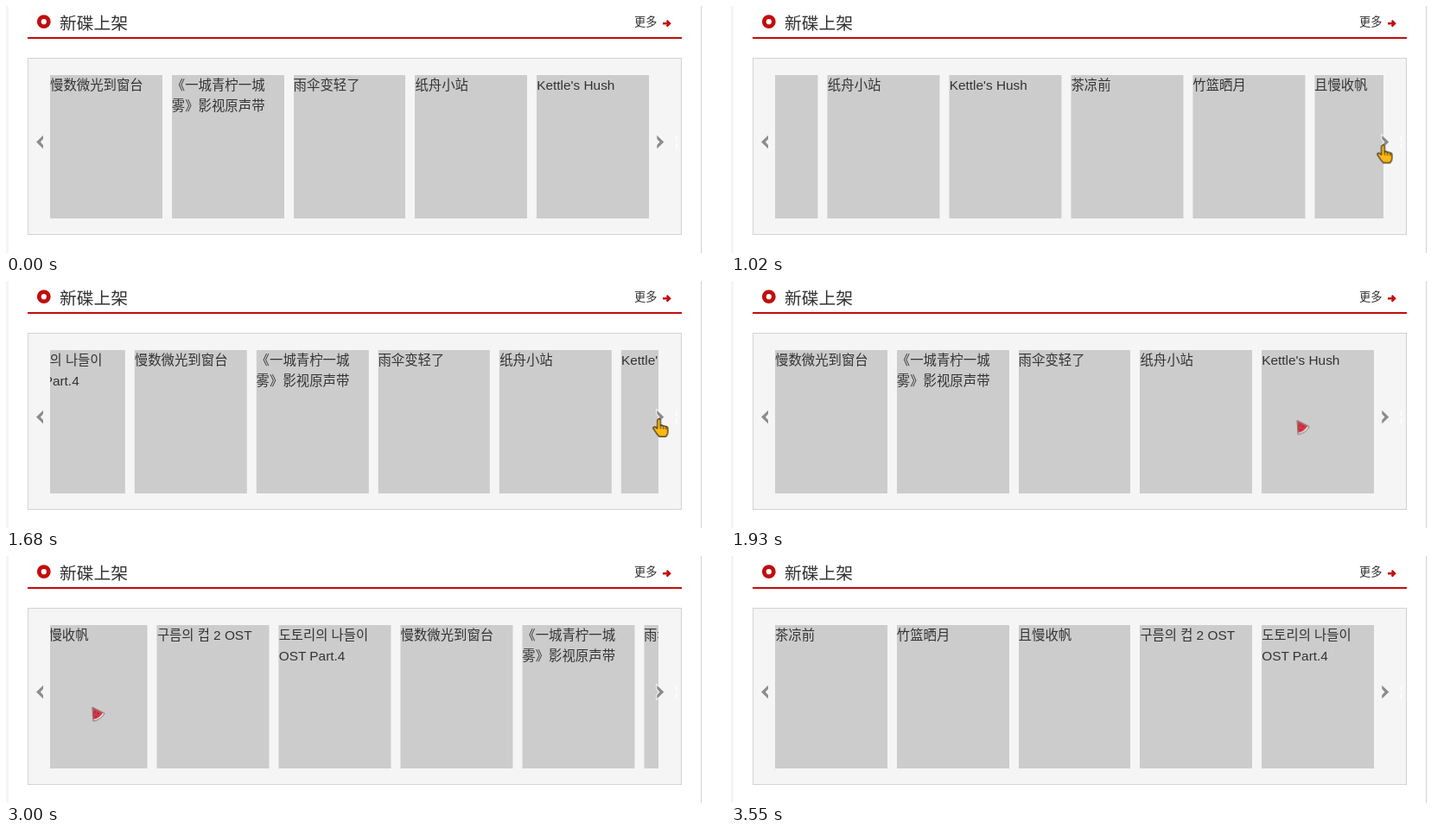
Animation of 832x286 px, one loop 3800 ms. Source, as an HTML page:

```html
<!DOCTYPE html>
<html lang="zh-CN">
<head>
<meta charset="utf-8">
<title>新碟上架</title>
<style>
html, body { margin: 0; width: 100%; height: 100%; overflow: hidden; background: #fff; }
body { position: relative; color: #333; font-family: "Liberation Sans", "Noto Sans Mono CJK SC", "Noto Sans CJK SC", "Noto Sans CJK", sans-serif; }
div, svg { position: absolute; box-sizing: border-box; }
svg { left: 0; top: 0; }
.edge { left: 0; top: 0; width: 3px; height: 286px; background: #f5f5f5; }
.side { left: 804px; top: 0; width: 1px; height: 286px; background: #d3d3d3; }
.title { left: 62px; top: 0; font-size: 19.8px; font-weight: 300; line-height: 40px; white-space: nowrap; }
.more { left: 727px; top: 0; font-size: 13.2px; line-height: 38px; white-space: nowrap; }
.rule { left: 25px; top: 36px; width: 757px; height: 2px; background: #c10d0c; }
.panel { left: 25px; top: 60px; width: 757px; height: 205px; background: #f5f5f5; border: 1px solid #d3d3d3; }
.view { left: 51px; top: 80px; width: 704px; height: 166px; overflow: hidden; }
.track { left: 0; top: 0; width: 2112px; height: 166px; animation: slide 3.8s infinite; }
.card { top: 0; width: 129.8px; height: 166px; background: #ccc; font-size: 15.4px; font-weight: 300; line-height: 24.2px; }

.cursor { animation: move 3.8s infinite linear; }
.hand { animation: hand 3.8s infinite step-end; }
.melon { animation: melon 3.8s infinite step-end; }
.press { animation: press 3.8s infinite step-end; }

@keyframes slide {
  0%, 19.868% { transform: translateX(0); animation-timing-function: cubic-bezier(.364, 0, .636, 1); }
  33.632%, 33.818% { transform: translateX(-704px); animation-timing-function: cubic-bezier(.364, 0, .636, 1); }
  47.582%, 71.424% { transform: translateX(-1408px); animation-timing-function: cubic-bezier(.364, 0, .636, 1); }
  85.188%, 100% { transform: translateX(-704px); }
}
@keyframes move {
  0%, 3.42% { transform: translate(790px, 288px); }
  7.89% { transform: translate(798px, 240px); }
  13.16% { transform: translate(776px, 190px); }
  16.84% { transform: translate(756px, 166px); }
  18.42%, 42.1% { transform: translate(754.5px, 160.5px); }
  44.21% { transform: translate(755.5px, 159px); }
  47.63% { transform: translate(755px, 161px); animation-timing-function: ease-in-out; }
  60% { transform: translate(27px, 165px); }
  67.1% { transform: translate(23px, 161px); }
  70%, 71.84% { transform: translate(39px, 160px); animation-timing-function: ease-in; }
  78.95% { transform: translate(99px, 175px); animation-timing-function: cubic-bezier(.35, .2, .6, 1); }
  88.95% { transform: translate(752px, 277px); }
  93.42%, 100% { transform: translate(768px, 288px); }
}
@keyframes hand {
  0%, 48.2%, 72.9%, 100% { visibility: hidden; }
  16.6%, 68.4% { visibility: visible; }
}
@keyframes melon {
  0%, 48.2%, 72.9%, 100% { visibility: visible; }
  16.6%, 68.4% { visibility: hidden; }
}
@keyframes press {
  0%, 20.26%, 34.2%, 71.7%, 100% { visibility: hidden; }
  18.16%, 31.97%, 69.47% { visibility: visible; }
}
</style>
</head>
<body>
<div class="edge"></div>
<div class="side"></div>
<div class="title">新碟上架</div>
<div class="more">更多</div>
<div class="rule"></div>
<div class="panel"></div>
<div class="view"><div class="track"></div></div>
<svg width="832" height="286" viewBox="0 0 832 286" fill="none">
  <circle cx="43.8" cy="18.2" r="5.5" stroke="#c10d0c" stroke-width="4.8"/>
  <path d="M760 20.2H767.5M764.6 16.8L768 20.2L764.6 23.6" stroke="#c10d0c" stroke-width="2.5"/>
  <path d="M43 149.8L35 157.5L43 165.2V161L39.8 157.5L43 154Z" fill="#8c8c8c"/>
  <path d="M753.3 149.8L761.3 157.5L753.3 165.2V161L756.5 157.5L753.3 154Z" fill="#8c8c8c" stroke="#f5f5f5" stroke-width="2" paint-order="stroke"/>
  <path d="M775.8 151V156M775.8 160V165" stroke="#fff" stroke-width="1.5"/>
  <g class="cursor">
    <g class="melon">
      <path d="M0 0L14 7Q9.7 14.7 1 16Z" fill="#fff" stroke="#4a544a" stroke-width=".8" stroke-linejoin="round"/>
      <path d="M.4 .6L12.2 6.4Q8.5 12.8 1.2 14.2Z" fill="#d43848"/>
      <path d="M3 5v1.3M6.5 6.5v1.3M4 10v1.3" stroke="#5a1a22"/>
    </g>
    <g class="hand" stroke="#2b2416" stroke-linejoin="round" stroke-linecap="round">
      <path transform="scale(.95 .98)" d="M-2 2.5a2 2 0 0 1 4 0V8.5q2-1 3.5 .6q2-.6 3.3 .8q2.2-.2 2.2 2.2v4q0 3-2.5 5.5h-8q-3-3-4.5-5.5l-3-4.5q.3-2 2.5-1.5l2.5 2z" fill="#ffb914" stroke-width="1.2"/>
      <path d="M2 8.5v3.5M5.2 9.2v3M8.3 10v2.6" stroke-width=".9"/>
    </g>
    <circle class="press" r="12" fill="#ff0" fill-opacity=".48"/>
  </g>
</svg>
<script>
const first = ["慢数微光到窗台", "《一城青柠一城雾》影视原声带", "雨伞变轻了", "纸舟小站", "Kettle's Hush"];
const second = ["茶凉前", "竹篮晒月", "且慢收帆", "구름의 컵 2 OST", "도토리의 나들이 OST Part.4"];
const track = document.querySelector(".track");

[...first, ...second, ...first].forEach((name, i) => {
  const card = document.createElement("div");
  card.className = "card";
  card.style.left = i * 140.8 + "px";
  card.textContent = name;
  track.append(card);
});
</script>
</body>
</html>
```
